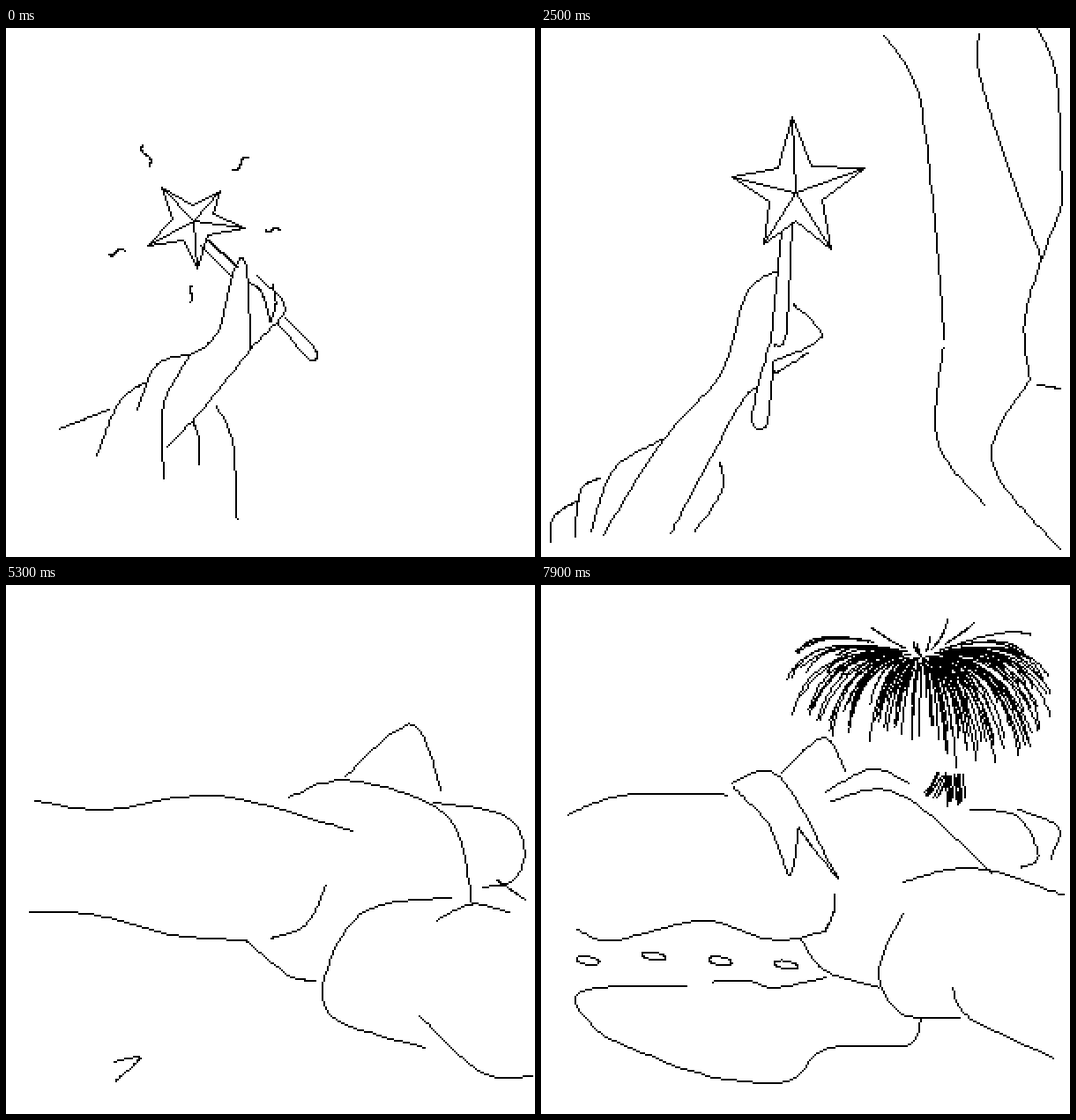
Recreate the animation shown at these times as an HTML page with a canvas. Size 600x600 px, loop 8000 ms.

```html
<!DOCTYPE html>
<html>
<head>
<meta charset="utf-8">
<style>
html, body { margin: 0; width: 100%; height: 100%; overflow: hidden; background: #fff; }
canvas { display: block; width: 100vmin; height: 100vmin; image-rendering: pixelated; }
</style>
</head>
<body>
<canvas id="stage" width="300" height="300"></canvas>
<script>
const LOOP = 8000, STEP = 100, SAMPLES = 40, SIZE = 300;
const ctx = document.getElementById('stage').getContext('2d');

const mix = (a, b, u) => a + (b - a) * u;
const mixPoint = (a, b, u) => [mix(a[0], b[0], u), mix(a[1], b[1], u)];
const clamp = v => Math.max(0, Math.min(1, v));
const parse = text => text.split(' ').map(s => s.split(',').map(Number));
const trace = f => Array.from({ length: SAMPLES + 1 }, (_, k) => f(k / SAMPLES));

function seeded(seed) {
  return () => (seed = seed * 16807 % 2147483647) / 2147483647;
}

// Smooth curve through a few key points.
function curve(text) {
  const p = parse(text), n = p.length - 1;
  const at = i => p[Math.max(0, Math.min(n, i))];
  return trace(s => {
    const i = Math.min(n - 1, Math.floor(s * n)), u = s * n - i;
    return [0, 1].map(d => {
      const a = at(i - 1)[d], b = at(i)[d], c = at(i + 1)[d], e = at(i + 2)[d];
      return b + u / 2 * (c - a + u * (2 * a - 5 * b + 4 * c - e + u * (3 * (b - c) + e - a)));
    });
  });
}

// Center followed by five tips: outline with notches, then the ribs.
function star(text) {
  const [center, ...tips] = parse(text), path = [];
  tips.forEach((tip, i) => {
    const middle = mixPoint(tip, tips[(i + 1) % 5], 0.5);
    path.push(tip, mixPoint(center, middle, 0.52));
  });
  for (const tip of tips) path.push(tip, center);
  return path;
}

// Each pair of points is a ray with one wave; the second five bend the other way.
function rays(text) {
  const p = parse(text), lines = {};
  for (let i = 0; i < p.length; i += 2) {
    const [[x, y], [x2, y2]] = [p[i], p[i + 1]], bend = i < 10 ? 0.12 : -0.12;
    lines['ray' + i] = trace(u => {
      const wave = bend * Math.sin(2 * Math.PI * u);
      return [mix(x, x2, u) - (y2 - y) * wave, mix(y, y2, u) + (x2 - x) * wave];
    });
  }
  return lines;
}

function stones(count) {
  const lines = {};
  for (let i = 0; i < count; i++)
    lines['stone' + i] = trace(u => {
      const a = u * 2 * Math.PI;
      return [53 + 75 * i + 13 * Math.cos(a), 426 - 5 * Math.sin(i * 1.6) + 5 * Math.sin(a + 0.4)];
    });
  return lines;
}

function curves(list) {
  return Object.fromEntries(Object.entries(list).map(([name, text]) => [name, curve(text)]));
}

// Strokes sharing a name morph into each other.
const scenes = [
  { at: 0, hair: 0, lines: {
    star: star('213,219 176,181 243,184 271,227 217,272 161,247'),
    ...rays('275,147 257,161 294,229 310,229 211,292 209,311 116,257 134,252 155,132 163,156'),
    ...curves({
      wand1: '228,240 262,270', wand2: '220,246 256,282',
      wand3: '316,328 351,365 344,376 308,335',
      arm1: '207,372 240,345 261,268 273,275 277,363',
      arm2: '183,475 225,430 277,365 316,318 284,281',
      grip1: '275,288 290,300 300,333', grip2: '300,333 306,312 302,290',
      sleeve1: '207,370 170,383 149,432', sleeve2: '207,374 178,430 179,511',
      sleeve3: '157,402 128,425 103,484', sleeve4: '60,455 116,433',
      sleeve5: '212,446 219,466 219,495', sleeve6: '238,428 257,470 262,557'
    })
  } },
  { at: 1000, hair: 0, lines: {
    star: star('325,167 235,135 353,77 417,146 389,240 265,232'),
    ...rays('413,16 375,91 448,123 533,89 427,184 543,241 445,248 543,355 126,307 225,242 '
      + '205,16 257,103 307,11 327,75 46,161 180,143 111,215 219,177 367,272 373,402'),
    ...curves({
      wand1: '318,205 303,250', wand2: '336,212 321,255',
      wand3: '291,328 290,369 311,367 312,332',
      arm1: '207,356 240,333 290,263 339,268 305,278',
      arm2: '157,523 190,467 265,378 292,346 292,330',
      grip1: '305,278 276,301 333,303 305,278', grip2: '306,299 283,318 329,323 306,299',
      sleeve1: '207,354 110,430 71,571', sleeve2: '190,366 150,420 117,562',
      sleeve3: '196,367 184,372 175,387', sleeve4: '25,473 85,433 104,437',
      sleeve5: '228,430 224,485 202,535', sleeve6: '247,427 268,460 257,565'
    })
  } },
  { at: 2500, hair: 0, lines: {
    star: star('288,187 216,168 285,101 367,158 328,250 252,245'),
    ...curves({
      wand1: '273,230 261,352', wand2: '285,220 278,345 265,360',
      wand3: '260,355 239,442 256,449 263,386',
      arm1: '70,575 140,465 205,390 233,300 268,275',
      arm2: '147,573 180,510 226,426 243,408',
      grip1: '286,313 318,350 263,378', grip2: '263,380 268,390 303,368',
      sleeve1: '137,467 82,500 57,571', sleeve2: '66,511 45,525 38,577',
      sleeve3: '41,536 14,555 10,583', sleeve5: '203,492 205,525 175,570',
      top: '389,8 427,72 446,213 457,353', bum: '456,362 450,470 503,540',
      under: '497,6 500,65 567,260', belly: '563,0 585,60 591,200',
      other: '591,200 550,320 554,398', thigh: '554,398 511,490 588,590', fold: '562,404 588,409'
    })
  } },
  { at: 4100, hair: 0, lines: curves({
    under: '32,72 120,160 212,225 262,372', bum: '262,372 305,468 404,499',
    top: '163,13 250,95 335,160 404,280', thigh: '480,340 392,395 405,490 485,514',
    low: '485,514 525,558 578,579', belly: '400,241 490,262 541,340',
    other: '486,438 510,370 590,339', limb1: '403,207 525,185 579,259',
    limb2: '422,220 530,218 557,290 581,308', fold: '292,372 347,372',
    fist1: '97,578 128,435 194,405 199,420',
    fist2: '151,460 168,423 218,430 213,468 158,530 145,575',
    fist3: '166,483 181,448 209,468', cuff1: '65,582 78,562 102,558', cuff2: '160,558 185,590'
  }) },
  { at: 5300, hair: 0, lines: curves({
    top: '32,244 112,255 240,239 393,279', under: '27,371 100,374 190,397 272,403',
    bum: '272,403 320,442 350,449', thigh: '505,354 400,375 362,480 475,525',
    low: '468,488 540,553 596,557', belly: '320,240 390,222 500,262 529,362',
    other: '488,381 528,362 570,371', limb1: '385,217 460,158 493,233',
    head: '485,247 567,262 588,303 574,335 540,343', chin: '556,334 589,357',
    fold: '300,401 340,385 363,340', fist2: '122,541 152,536 125,562'
  }) },
  { at: 7000, hair: 0.4, lines: curves({
    top: '23,271 95,248 210,237', under: '23,402 125,383 290,399', fold: '290,399 328,355 323,312',
    bum: '289,400 315,445 373,461', thigh: '415,360 382,440 410,495 480,505',
    low: '461,470 485,505 582,526', belly: '330,235 410,232 509,318', other: '425,335 500,321 592,349',
    hand1: '209,236 250,216 333,265', hand2: '210,237 243,247 278,325 277,260',
    hand3: '277,260 335,317 292,228',
    hill1: '270,203 305,180 335,212', hill2: '325,230 370,201 414,236',
    hill3: '445,238 505,246 548,298 535,312', head: '521,249 587,270 565,321',
    cheek1: '395,183 405,160 437,152', cheek2: '437,188 460,150 425,216', cheek3: '483,180 495,195 492,224'
  }) },
  { at: 7900, hair: 1, lines: {
    ...stones(4),
    ...curves({
      top: '31,260 95,238 210,238', under: '40,390 80,403 185,381 265,403 323,392',
      fold: '323,392 332,370 332,350', bum: '295,402 322,437 382,456',
      thigh: '410,372 383,440 410,486 475,491', low: '467,456 485,490 581,536',
      belly: '328,245 405,236 511,326', other: '410,337 490,321 592,351',
      hand1: '216,225 270,217 336,332', hand2: '218,229 260,275 282,329 292,275',
      hand3: '292,275 310,300 336,332',
      hill1: '273,213 320,173 345,210', hill2: '323,234 375,209 417,224',
      hill3: '487,255 540,262 564,307 545,320', head: '540,254 587,275 578,310',
      pond: '165,455 45,460 60,502 115,530 195,558 280,562 325,525 415,522 430,492',
      shore: '195,450 235,449 265,457 323,445'
    })
  } }
];

// One-pixel line without smoothing.
function segment(a, b) {
  const [x, y, x2, y2] = [...a, ...b].map(v => Math.floor(v / 2));
  const n = Math.max(Math.abs(x2 - x), Math.abs(y2 - y), 1);
  for (let i = 0; i <= n; i++)
    ctx.fillRect(Math.round(mix(x, x2, i / n)), Math.round(mix(y, y2, i / n)), 1, 1);
}

function stroke(points, part = 1) {
  const end = Math.round((points.length - 1) * part);
  for (let i = 0; i < end; i++) segment(points[i], points[i + 1]);
}

// Locks of hair thicken into the drooping crown of a palm.
function crown(h) {
  const rnd = seeded(71), cx = 433, cy = mix(64, 82, h);
  for (let i = 0; i < 165 * h; i++) {
    const side = rnd() * 2 - 1, round = 1 - side * side;
    const high = -72 + 45 * side * side;
    const low = 65 + 42 * Math.sqrt(round) + 110 * Math.max(0, side) * round;
    const drop = mix(high, low, Math.sqrt(rnd()));
    const tip = [cx + side * 155, cy + drop];
    const knee = [cx + side * (110 + 30 * rnd()), cy + drop * 0.25 - 45 * Math.abs(side)];
    const from = mix(0.4, 0.12, h) + rnd() * 0.25, to = 0.85 + rnd() * 0.15;
    stroke(trace(k => {
      const u = mix(from, to, k);
      return mixPoint(mixPoint([cx, cy], knee, u), mixPoint(knee, tip, u), u);
    }));
  }
  for (let i = 0; i < 9 * h; i++) {
    const x = 458 + i * 2.5, y = 199 + 14 * h;
    segment([x, y + rnd() * 6], [x + 2, y + 27 + rnd() * 12]);
    segment([434 + i * 2, y + 30 - rnd() * 8], [446 + i * 2, y + rnd() * 10]);
  }
}

function draw(t) {
  let i = scenes.length - 2;
  while (scenes[i].at > t) i--;
  const a = scenes[i], b = scenes[i + 1], u = clamp((t - a.at) / (b.at - a.at));
  ctx.fillStyle = '#fff';
  ctx.fillRect(0, 0, SIZE, SIZE);
  ctx.fillStyle = '#000';
  for (const name of new Set([...Object.keys(a.lines), ...Object.keys(b.lines)])) {
    const p = a.lines[name], q = b.lines[name];
    if (p && q) stroke(p.map((v, k) => mixPoint(v, q[k], u)));
    else if (p) stroke(p, clamp(1 - u * 1.8));
    else stroke(q, clamp(u * 1.8 - 0.8));
  }
  crown(mix(a.hair, b.hair, u));
}

const start = performance.now();
function tick() {
  const t = (performance.now() - start) % LOOP;
  draw(Math.floor(t / STEP) * STEP);
  requestAnimationFrame(tick);
}
tick();
</script>
</body>
</html>
```
